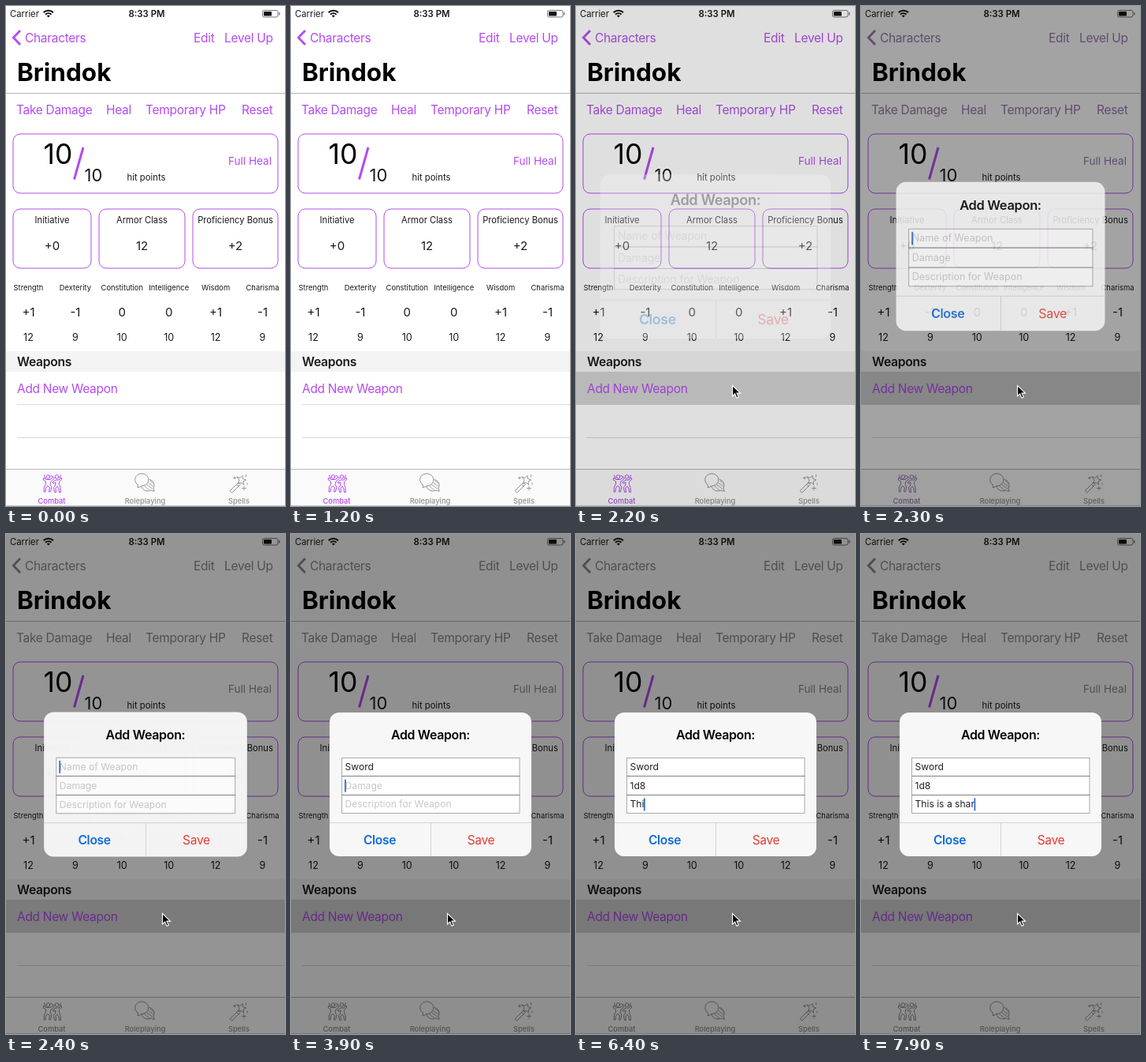
Write an HTML page that moves like this. It is 354x633 px and loops after 8 s.

```html
<!DOCTYPE html>
<html lang="en">
<head>
<meta charset="utf-8">
<title>Character sheet</title>
<style>
  html, body { margin: 0; width: 100%; height: 100%; overflow: hidden; background: #fff; }
  svg { display: block; width: 100vw; height: 100vh; font-family: Inter, "Noto Sans", sans-serif; --tint: #b44bf0; }
  .tint { fill: var(--tint); }
  .icon { fill: none; stroke: #929292; stroke-width: 1; stroke-linecap: round; stroke-linejoin: round; }
  .icon.on { stroke: var(--tint); }
  .frame { fill: none; stroke: #b44bf0; }
</style>
</head>
<body>
<svg id="stage" viewBox="0 0 354 633" xmlns="http://www.w3.org/2000/svg">
  <rect width="354" height="633" fill="#fff"/>

  <!-- status bar -->
  <g fill="none" stroke="#111" stroke-width="2">
    <path d="M47.6 8.2a9 9 0 0 1 12.4 0M50 10.7a5.6 5.6 0 0 1 7.6 0"/>
    <path d="M53.8 14.6l-2-2.2a3 3 0 0 1 4 0z" fill="#111" stroke="none"/>
    <rect x="325.5" y="5.5" width="19.5" height="8.5" rx="2" stroke-width="1" stroke="#777"/>
    <rect x="327" y="7" width="10" height="5.5" rx=".8" fill="#111" stroke="none"/>
    <path d="M346.8 8v3.6" stroke="#777" stroke-width="1.3"/>
  </g>

  <path d="M18 31l-8.6 9 8.6 9" fill="none" stroke="var(--tint)" stroke-width="2.8"/>
  <path d="M0 110.5h354" stroke="#b5b5b7"/>

  <!-- hit points and stat boxes -->
  <g class="frame">
    <rect x="9" y="162" width="336" height="75" rx="9"/>
    <rect x="9" y="257" width="99" height="75" rx="9"/>
    <rect x="118" y="257" width="109" height="75" rx="9"/>
    <rect x="237" y="257" width="108" height="75" rx="9"/>
    <path d="M86.5 219.5L98 179" stroke-width="3"/>
  </g>

  <!-- weapons list -->
  <rect y="437" width="354" height="26" fill="#f4f4f4"/>
  <path d="M14 504.5h340M14 546.5h340" stroke="#d8d8da"/>
  <rect id="pressed" y="463" width="354" height="42" fill="#d3d3d3"/>

  <!-- tab bar -->
  <rect y="586" width="354" height="47" fill="#fafafa"/>
  <path d="M0 586.5h354" stroke="#b5b5b7"/>
  <path d="M0 632.5h354" stroke="#cfcfcf"/>
  <g class="icon on">
    <circle cx="53.5" cy="596" r="2.3"/><circle cx="64.5" cy="596" r="2.3"/>
    <path d="M48 597.5l3 2h5l4-3 1.500 1.500-4.500 4-1 4 2 3-1.500 6h-2l1-5.500-3-2-2 3-.5 4.500h-2l.5-6 2-4v-3l-3-2z"/>
    <path d="M70 597.500l-3 2.500h-4l-4 3 1 1.500 3-1.500-.5 4-2 2.500 1 6h2l-.5-5 2-2.500 2 3 .5 4.500h2l-.5-6-1.500-4v-3l3-3z"/>
    <path d="M48.500 594l1.500 4M69.500 594l-1.500 4M57 594.500l3 1.500"/>
  </g>
  <g class="icon">
    <path d="M167 606a8.6 7.8 0 1 1 5 1.6q-2 2-5 2 1.4-2 0-3.6z"/>
    <path d="M182 599.5a7.5 7 0 0 1 5 10.500q-.2 2 1.500 4.200-3 0-4.500-1.200a8 7 0 0 1-12-4.500"/>
    <path d="M176 608l6 5M178.500 606l7 5M181 604l6 4M183 601l4 3.500" stroke-width=".8"/>
  </g>
  <g class="icon">
    <path d="M284.500 613.500l10.500-10.500 2.500 2.500-10.500 10.500zM292.500 605.500l2.500 2.500"/>
    <path d="M293 596l4 1.500 3-3 .5 4 4 1.500-3.500 2 .5 4-3-2.500-4 1 1.500-4z"/>
    <path d="M302 608v5M299.500 610.500h5M290 596v3M288.500 597.500h3M304.500 593.500v2.500M306 604v2" stroke-width=".9"/>
  </g>

  <g id="labels"></g>
  <rect id="dim" width="354" height="633" fill="#000"/>

  <g id="alert">
    <rect x="49" y="226" width="256" height="182" rx="12" fill="#f7f7f7"/>
    <rect x="64.5" y="283.500" width="225.500" height="70" fill="#fff" stroke="#aaa"/>
    <path d="M64 306.500h226.500M64 330.500h226.500" stroke="#808080"/>
    <path d="M49 365.500h256M177.500 365.500V408" stroke="#d4d4d6"/>
    <g id="alertLabels"></g>
    <rect id="caret" width="1.8" height="16" fill="#2f6fd6"/>
  </g>

  <path id="pointer" d="M0 0v13.500l3.200-3 2.300 5.300 2.300-1-2.300-5.200h4.500z" fill="#000" stroke="#fff" stroke-width="1.100"/>
</svg>
<script>
const LOOP = 8000;
const $ = id => document.getElementById(id);

function label(parent, text, x, y, size, opt = {}) {
  const el = document.createElementNS("http://www.w3.org/2000/svg", "text");
  el.textContent = text;
  const attrs = {
    x, y, "font-size": size,
    "font-weight": opt.weight || 400,
    "text-anchor": opt.left ? "start" : "middle",
    "letter-spacing": size > 15 && size < 20 ? "-0.02em" : 0
  };
  if (opt.tint) attrs.class = "tint";
  else attrs.fill = opt.fill || "#1a1a1a";
  for (const key in attrs) el.setAttribute(key, attrs[key]);
  return parent.appendChild(el);
}

const page = $("labels");
label(page, "Carrier", 5, 13.5, 11.3, { left: true });
label(page, "8:33 PM", 178.5, 13.5, 11.4, { weight: 600 });
label(page, "Brindok", 14, 95, 31.5, { left: true, weight: 700, fill: "#000" });

[["Characters", 24, 45.5], ["Edit", 238, 45.5], ["Level Up", 277, 45.5],
 ["Take Damage", 13, 137], ["Heal", 127, 137], ["Temporary HP", 177, 137], ["Reset", 299, 137]]
  .forEach(([text, x, y]) => label(page, text, x, y, 15.5, { left: true, tint: true }));

label(page, "10", 66, 200, 35.5, { fill: "#000" });
label(page, "10", 111, 221.5, 22);
label(page, "hit points", 178, 221, 11.3);
label(page, "Full Heal", 309.5, 201, 13.6, { tint: true });

[["Initiative", "+0", 58.5], ["Armor Class", "12", 172.5], ["Proficiency Bonus", "+2", 291]]
  .forEach(([name, value, x]) => {
    label(page, name, x, 274.7, 11.2);
    label(page, value, x, 308.5, 15);
  });

[["Strength", "+1", 12], ["Dexterity", "-1", 9], ["Constitution", "0", 10],
 ["Intelligence", "0", 10], ["Wisdom", "+1", 12], ["Charisma", "-1", 9]]
  .forEach(([name, bonus, score], i) => {
    const x = 28.5 + i * 59.4;
    label(page, name, x, 360.3, 9.4);
    label(page, bonus, x, 393, 15);
    label(page, score, x, 424, 12.6);
  });

label(page, "Weapons", 14, 455.5, 15.7, { left: true, weight: 600 });
label(page, "Add New Weapon", 14, 489.5, 15.5, { left: true, fill: "#b44bf0" });

label(page, "Combat", 58, 629.5, 9.3, { weight: 500, tint: true });
label(page, "Roleplaying", 176.5, 629.5, 9.3, { weight: 500, fill: "#929292" });
label(page, "Spells", 295.5, 629.5, 9.3, { weight: 500, fill: "#929292" });

const alertText = $("alertLabels");
label(alertText, "Add Weapon:", 177, 260, 15.9, { weight: 600, fill: "#000" });
label(alertText, "Close", 112.5, 392.5, 15.5, { weight: 600, fill: "#0c6bdc" });
label(alertText, "Save", 241, 392.5, 15.5, { fill: "#e63b33" });

// Each field: placeholder, typed text, focus time, first key time, key interval
const fields = [
  ["Name of Weapon", "Sword", 2250, 2900, 150],
  ["Damage", "1d8", 3750, 4350, 260],
  ["Description for Weapon", "This is a sharp", 5450, 6110, 136]
].map(([hint, text, focus, start, step], row) => ({
  hint, text, focus, start, step, row,
  el: label(alertText, hint, 68.5, 299 + row * 23.7, 12.1, { left: true })
}));

const clamp = v => Math.min(1, Math.max(0, v));
const mix = (a, b, p) => a.map((v, i) => Math.round(v + (b[i] - v) * p));

// Critically damped spring from 0 to 1
function spring(ms) {
  const x = Math.max(0, ms) * 0.021;
  return 1 - Math.exp(-x) * (1 + x);
}

function drawFields(t) {
  let active = fields[0];
  for (const f of fields) {
    const count = Math.max(0, Math.floor((t - f.start) / f.step) + 1);
    f.typed = f.text.slice(0, count);
    const shown = f.typed || f.hint;
    if (f.el.textContent !== shown) f.el.textContent = shown;
    f.el.setAttribute("fill", f.typed ? "#222" : "#c7c7cb");
    if (t >= f.focus) active = f;
  }
  const width = active.typed ? active.el.getComputedTextLength() : 0;
  $("caret").setAttribute("x", 68 + width);
  $("caret").setAttribute("y", 287 + active.row * 23.7);
  $("caret").setAttribute("opacity", t >= active.focus ? 1 : 0);
}

function draw(t) {
  const p = spring(t - 2150);
  const scale = 1.2 - 0.2 * p;
  $("stage").style.setProperty("--tint", `rgb(${mix([180, 75, 240], [138, 138, 138], p * p)})`);
  $("pressed").setAttribute("opacity", t >= 2000 ? 1 : 0);
  $("dim").setAttribute("opacity", 0.435 * p);
  $("alert").setAttribute("opacity", p);
  $("alert").setAttribute("transform", `translate(177 317) scale(${scale}) translate(-177 -317)`);

  const glide = 1 - (1 - clamp((t - 1600) / 300)) ** 2;
  $("pointer").setAttribute("opacity", t >= 1600 ? 1 : 0);
  $("pointer").setAttribute("transform", `translate(${212 - 13.5 * glide} ${610 - 129.5 * glide})`);
  drawFields(t);
}

function tick(now) {
  draw(now % LOOP);
  requestAnimationFrame(tick);
}
draw(0);
requestAnimationFrame(tick);
</script>
</body>
</html>
```
